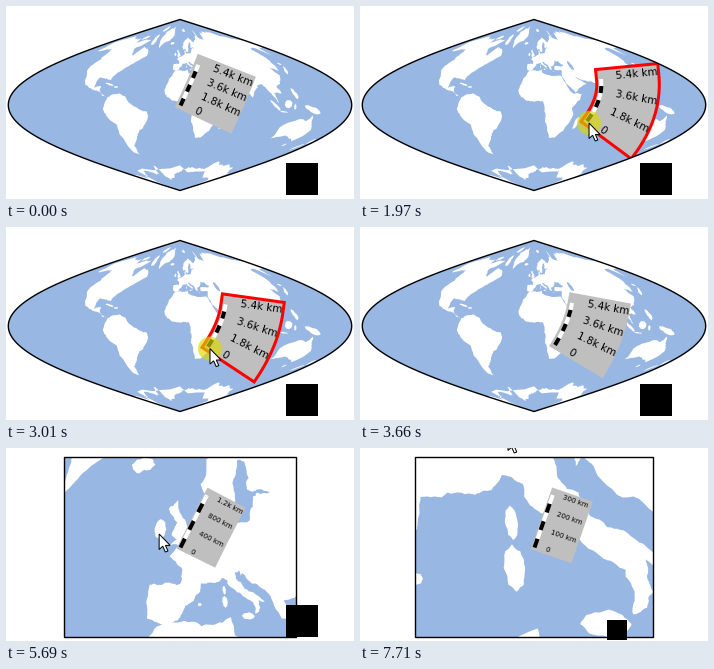
Write a matplotlib script that moves like this. It is 348 by 193 pixels and loops after 7.99 s.

```python
import numpy as np
import matplotlib.pyplot as plt
from matplotlib.animation import FuncAnimation
from matplotlib.collections import PolyCollection
from matplotlib.patches import Circle, PathPatch, Polygon, Rectangle, Wedge
from matplotlib.path import Path

W, H, DPI = 348, 193, 100
LOOP, STEP = 7990, 34
PT = 72 / DPI  # points per pixel
OCEAN, GRAY = "#98b7e2", "#bfbfbf"
MIDDLE = np.array([174.5, 99.5])
rng = np.random.default_rng(4)

# Key points of the coasts as lon, lat pairs; roughen() adds the detail
NORTH_AMERICA = [
    -168, 66, -156, 71, -128, 70, -95, 69, -82, 68, -94, 60, -80, 52, -77, 61,
    -65, 59, -56, 52, -65, 46, -75, 38, -81, 26, -96, 29, -95, 18, -88, 20,
    -83, 10, -78, 8, -95, 16, -106, 21, -113, 30, -124, 41, -124, 48, -138, 59,
    -158, 57]
SOUTH_AMERICA = [
    -77, 8, -62, 10.5, -50, 0, -35, -7, -40, -21, -48, -27, -57, -37, -65, -42,
    -69, -52, -75, -50, -71, -20, -81, -5]
GREENLAND = [-70, 78, -32, 83.5, -20, 73, -40, 65, -44, 60, -53, 67, -58, 76]
AFRICA = [
    -6, 35.8, 1, 36.5, 10, 37.3, 10.5, 34, 20, 31, 32.5, 31, 37, 20, 43, 11.8,
    51, 12, 40, -3, 40, -15, 35, -24, 27, -33.5, 19, -34.5, 12, -17, 9, 4,
    -8, 4.5, -17, 15, -13, 27.7]
EUROPE_NORTH = [
    -5.6, 36, -9, 37, -9.2, 43.2, -1.6, 43.4, -1.2, 46, -4.7, 48.4, 1.6, 50.8,
    8.5, 53.8, 8.2, 57, 10.5, 57.5, 10.5, 54.2, 19, 54.6, 22, 57.3, 23.5, 59.3,
    30, 60, 22, 60.5, 25, 65.5, 22, 65.7, 17.3, 61.5, 16, 56.5, 13, 55.6,
    11, 59, 7, 58, 5.2, 61.5, 14, 68, 25, 71, 41, 67]
EUROPE_SOUTH = [
    39, 47, 34, 45.5, 30.8, 46.5, 28, 42, 23, 40.4, 23.5, 37, 21.5, 37,
    19.5, 41.8, 15, 44.4, 14.3, 45.3, 13.7, 44.8, 13.6, 45.7, 12.3, 45.3,
    12.4, 44.3, 13.6, 43.6, 14.1, 42.5, 16.1, 41.8, 18.4, 40.1, 17, 40.5,
    17.1, 39, 15.7, 37.95, 16, 39, 15.7, 40, 14.1, 40.8, 12.2, 41.8, 10.4, 43,
    10.1, 44, 8.8, 44.4, 7, 43.5, 3.5, 43.4, 3.2, 41.9, -0.3, 39.4, -2.1, 36.7]
ASIA = [
    35, 66, 68, 68.5, 104, 77, 140, 72, 180, 69, 180, 63, 163, 59, 157, 52,
    156, 60, 142, 58, 140, 52, 133, 43, 128, 36, 121, 39, 122, 31, 113, 22,
    107, 19, 109, 12, 101, 13, 104, 2, 98, 12, 92, 22, 87, 21, 80, 14, 77, 8,
    72, 20, 66, 25, 57, 26, 49, 30, 56, 25, 60, 22, 45, 13, 34, 30, 36, 36.5,
    27, 37, 29, 41, 41, 42, 35, 48]
BRITAIN = [-5, 50.2, 1.4, 51.3, 0.3, 53.5, -2, 56, -3, 58.6, -6, 57, -3, 54.5,
           -4.5, 52.2, -3, 51.4]
AUSTRALIA = [114, -23, 129, -15, 138, -17, 142, -11, 146, -19, 153, -27,
             148, -38, 138, -35, 130, -32, 116, -35]
ANTARCTICA = [-200, -90, -200, -78, -140, -75, -75, -73, -60, -64, -60, -75,
              -35, -77, 0, -70, 60, -67, 140, -67, 168, -74, 200, -78, 200, -90]
# Islands as ellipses: lon, lat, half width, half height, tilt
ISLANDS = [
    (-8, 53.3, 1.8, 1.8, 0), (-18.5, 65, 5, 1.3, 0), (9, 40.1, 0.65, 1.1, 0),
    (9.1, 42.2, 0.4, 0.8, 0), (14, 37.5, 1.5, 0.6, 0), (3, 39.6, 0.45, 0.3, 0),
    (24.9, 35.2, 1.3, 0.2, 0), (18, 78.5, 7, 1.7, 0), (59, 74, 8, 1.3, 40),
    (-108, 71, 7, 2, 0), (-80, 80, 10, 3, 0), (-72, 69, 11, 3, -28),
    (-79.5, 21.7, 5.5, 0.9, -15), (-71, 19, 2.5, 0.9, 0), (46.7, -19, 2, 7, -14),
    (138, 36.5, 6.5, 1.2, 40), (143, 43.3, 2, 1.2, 0), (100.5, -0.5, 8, 1.5, -45),
    (110, -7.2, 4.5, 0.7, -8), (114, 1, 4, 4.5, -30), (121, -2, 1.2, 3, 0),
    (140, -5, 10, 2.8, -25), (123, 12, 2.3, 6, 12), (146.7, -42, 1.6, 1.4, 0),
    (175.5, -38.5, 1.8, 2.8, 0), (170.5, -44, 1.5, 4, -40)]
CASPIAN = (51, 41.5, 2.5, 5, 10)


def roughen(coords, levels=4, amp=0.07):
    """Seeded midpoint displacement of a closed coast."""
    p = np.reshape(coords, (-1, 2)).astype(float)
    for _ in range(levels):
        step = np.roll(p, -1, axis=0) - p
        side = step[:, ::-1] * [1, -1] * rng.normal(0, amp, (len(p), 1))
        p = np.stack([p, p + step / 2 + side], axis=1).reshape(-1, 2)
    return p


def ellipse(lon, lat, rx, ry, tilt):
    a, r = np.linspace(0, 2 * np.pi, 9)[:-1], np.radians(tilt)
    x, y = rx * np.cos(a), ry * np.sin(a)
    return np.c_[lon + x * np.cos(r) - y * np.sin(r),
                 lat + x * np.sin(r) + y * np.cos(r)]


def project(p):
    """Sinusoidal projection, in pixels from the map's centre."""
    lon, lat = np.asarray(p, float).T
    return np.c_[171.7 * lon / 180 * np.cos(np.radians(lat)), -85.5 * lat / 90]


def unproject(x, y):
    lat = -y * 90 / 85.5
    return x * 180 / 171.7 / np.cos(np.radians(lat)), lat


def geodesic(lon, lat, azimuth, dist):
    """Great-circle points at the given distances in degrees."""
    la, az, d = np.radians(lat), np.radians(azimuth), np.radians(dist)
    sin_end = np.sin(la) * np.cos(d) + np.cos(la) * np.sin(d) * np.cos(az)
    turn = np.arctan2(np.sin(az) * np.sin(d) * np.cos(la),
                      np.cos(d) - np.sin(la) * sin_end)
    return np.c_[lon + np.degrees(turn), np.degrees(np.arcsin(sin_end))]


def rect(cx, cy, dx, dy):
    return np.array([[cx - dx, cy - dy], [cx + dx, cy - dy],
                     [cx + dx, cy + dy], [cx - dx, cy + dy]])


coasts = [roughen(c) for c in (
    NORTH_AMERICA, SOUTH_AMERICA, GREENLAND, AFRICA, EUROPE_NORTH + EUROPE_SOUTH,
    ASIA, BRITAIN, AUSTRALIA, ANTARCTICA)]
coasts += [roughen(ellipse(*island), 2) for island in ISLANDS]
lake = roughen(ellipse(*CASPIAN), 2)

fig = plt.figure(figsize=(W / DPI, H / DPI), dpi=DPI, facecolor="white")
ax = fig.add_axes([0, 0, 1, 1])
ax.set(xlim=(0, W), ylim=(H, 0))
ax.axis("off")


class View:
    """One zoom level of the map with its frame, scale bar size and badge."""

    def __init__(self, start, zoom, center, half, km, size, badge):
        self.start, self.zoom, self.center = start, zoom, np.array(center)
        self.km, self.size = km, size
        if half:
            edge = rect(*MIDDLE, *half)
        else:
            lat = np.linspace(-90, 90, 91)
            lon = np.full(91, 180)
            edge = self.to_screen(np.r_[np.c_[lon, lat], np.c_[-lon, lat[::-1]]])
        sea = ax.add_patch(Polygon(edge, fc=OCEAN, ec="none", zorder=0))
        self.artists = [sea]
        for shapes, color in ((coasts, "white"), ([lake], OCEAN)):
            coll = PolyCollection([self.to_screen(s) for s in shapes],
                                  fc=color, lw=0, zorder=1)
            ax.add_collection(coll, autolim=False)
            coll.set_clip_path(sea)
            self.artists.append(coll)
        # White page with the map cut out hides what leaves the map
        area = np.sum(edge[:, 0] * np.roll(edge[:, 1], -1)
                      - edge[:, 1] * np.roll(edge[:, 0], -1))
        hole = edge[::-1] if area > 0 else edge
        page = rect(W / 2, H / 2, W, H)
        paths = [Path(np.vstack([p, p[:1]]), closed=True) for p in (page, hole)]
        cx, cy, side = badge
        for patch in (
                PathPatch(Path.make_compound_path(*paths), fc="white", ec="none", zorder=5),
                Polygon(edge, fill=False, ec="black", lw=1.4 * PT, snap=False, zorder=6),
                Polygon(rect(cx, cy, side / 2, side / 2), fc="black", zorder=7)):
            self.artists.append(ax.add_patch(patch))

    def to_screen(self, p):
        return (project(p) - self.center) * self.zoom + MIDDLE

    def to_lonlat(self, point):
        return unproject(*((point - MIDDLE) / self.zoom + self.center))


VIEWS = [
    View(0, 1, (0.5, 0.5), None, 5400, 1, (296, 173, 32)),
    View(5020, 5.8, (-1.1, -47.45), (116, 90), 1200, 0.69, (296, 173, 32)),
    View(6680, 22.7, (7.45, -39), (119, 90), 300, 0.69, (257, 182, 20)),
]

# Pointer moves: begin, end, x, y; it rests in between
POINTER_START = (146, 158)
MOVES = [(340, 690, 188, 102), (1310, 1970, 229, 117), (1970, 2480, 245, 131),
         (2820, 3060, 197, 120), (3210, 3660, 116, -24), (3700, 3900, 146, -24),
         (4060, 4420, 153, 36), (4480, 4960, 193, 67), (5570, 5800, 128, 98),
         (5800, 6060, 192, 125), (6110, 6410, 250, 171), (7260, 7710, 148, -13)]
PRESSED = [(690, 3210), (4440, 4960), (6080, 6470)]
BUSY = [(4960, 5570), (6470, 7260)]
SELECT = [(4440, 5020, 153, 36), (6080, 6680, 192, 125)]
PICK, DROP = 1130, 3210
AZIMUTH, KM_PER_DEG = 25, 111.2
ARROW = np.array([[0, 0], [0, 15.5], [3.6, 12.2], [6.2, 18], [8.8, 17],
                  [6.3, 11.4], [11, 11.4]])


def within(spans, t):
    return any(a <= t < b for a, b in spans)


def pointer(t):
    pos = np.array(POINTER_START, float)
    for begin, end, x, y in MOVES:
        pos += (np.array([x, y]) - pos) * np.clip((t - begin) / (end - begin), 0, 1)
    return pos


def distance_label(km):
    if km == 0:
        return "0"
    return f"{km / 1000:.1f}k km" if km >= 1000 else f"{km:.0f} km"


plate = ax.add_patch(Polygon(ARROW, fc=GRAY, joinstyle="miter", zorder=3))
cells = [ax.plot([], [], color=c, lw=4 * PT, solid_capstyle="butt", zorder=4)[0]
         for c in ("black", "white") * 3]
texts = [ax.text(0, 0, "", family="DejaVu Sans", va="center", ha="left",
                 rotation_mode="anchor", zorder=4.5) for _ in range(4)]
select = ax.add_patch(Rectangle((0, 0), 1, 1, fill=False, ec="black", lw=PT,
                                ls=(0, (3, 2)), zorder=8))
halo = ax.add_patch(Circle((0, 0), 12, fc="#dcd800", ec="none", alpha=0.65, zorder=9))
arrow = ax.add_patch(Polygon(ARROW, fc="white", ec="black", lw=PT, zorder=10))
ring = [ax.add_patch(Wedge((0, 0), 9.8, a, b, width=4.2, fc=c, ec="none", zorder=10))
        for a, b, c in ((0, 360, "#1e90f5"), (180, 270, "#6cc0ff"))]


def draw_scale(view, t):
    """Great-circle bar; plate and labels are offset along its normals."""
    start = MIDDLE
    if PICK <= t and view is VIEWS[0]:
        start = pointer(min(t, DROP)) - 2
    dist = np.linspace(0, view.km / KM_PER_DEG, 19)
    bar = view.to_screen(geodesic(*view.to_lonlat(start), AZIMUTH, dist))
    along = np.gradient(bar, axis=0)
    along /= np.hypot(*along.T)[:, None]
    normal = along[:, ::-1] * [-1, 1]

    k = view.size
    spine = bar.copy()
    spine[0] -= 4 * k * along[0]
    spine[-1] += 10 * k * along[-1]
    plate.set_xy(np.vstack([spine - 4.5 * k * normal, (spine + 58 * k * normal)[::-1]]))
    picked = PICK <= t < DROP
    plate.set_edgecolor("red" if picked else "none")
    plate.set_linewidth(3 * PT if picked else 0)

    for i, cell in enumerate(cells):
        cell.set_data(*bar[3 * i:3 * i + 4].T)
    for i, text in enumerate(texts):
        n, a = normal[6 * i], along[6 * i]
        text.set_text(distance_label(view.km * i / 3))
        text.set_position(bar[6 * i] + k * (15 * n + 2 * a))
        text.set_rotation(-np.degrees(np.arctan2(n[1], n[0])))
        text.set_fontsize(10.4 * k * PT)


def update(k):
    t = k * STEP + STEP - 1
    view = [v for v in VIEWS if t >= v.start][-1]
    for v in VIEWS:
        for artist in v.artists:
            artist.set_visible(v is view)
    draw_scale(view, t)

    tip = pointer(t)
    waiting = within(BUSY, t)
    arrow.set_xy(ARROW + tip)
    arrow.set_visible(t >= MOVES[0][0] and not waiting)
    halo.center = tuple(tip)
    halo.set_visible(within(PRESSED, t))
    for part in ring:
        part.set_center(tuple(tip))
        part.set_visible(waiting)

    select.set_visible(False)
    for begin, end, x, y in SELECT:
        if begin <= t < end:
            select.set_visible(True)
            select.set_bounds(x + 0.5, y + 0.5, tip[0] - x, tip[1] - y)
    return []


anim = FuncAnimation(fig, update, frames=LOOP // STEP, interval=STEP,
                     repeat=True, repeat_delay=0, blit=False)
plt.show()
```
